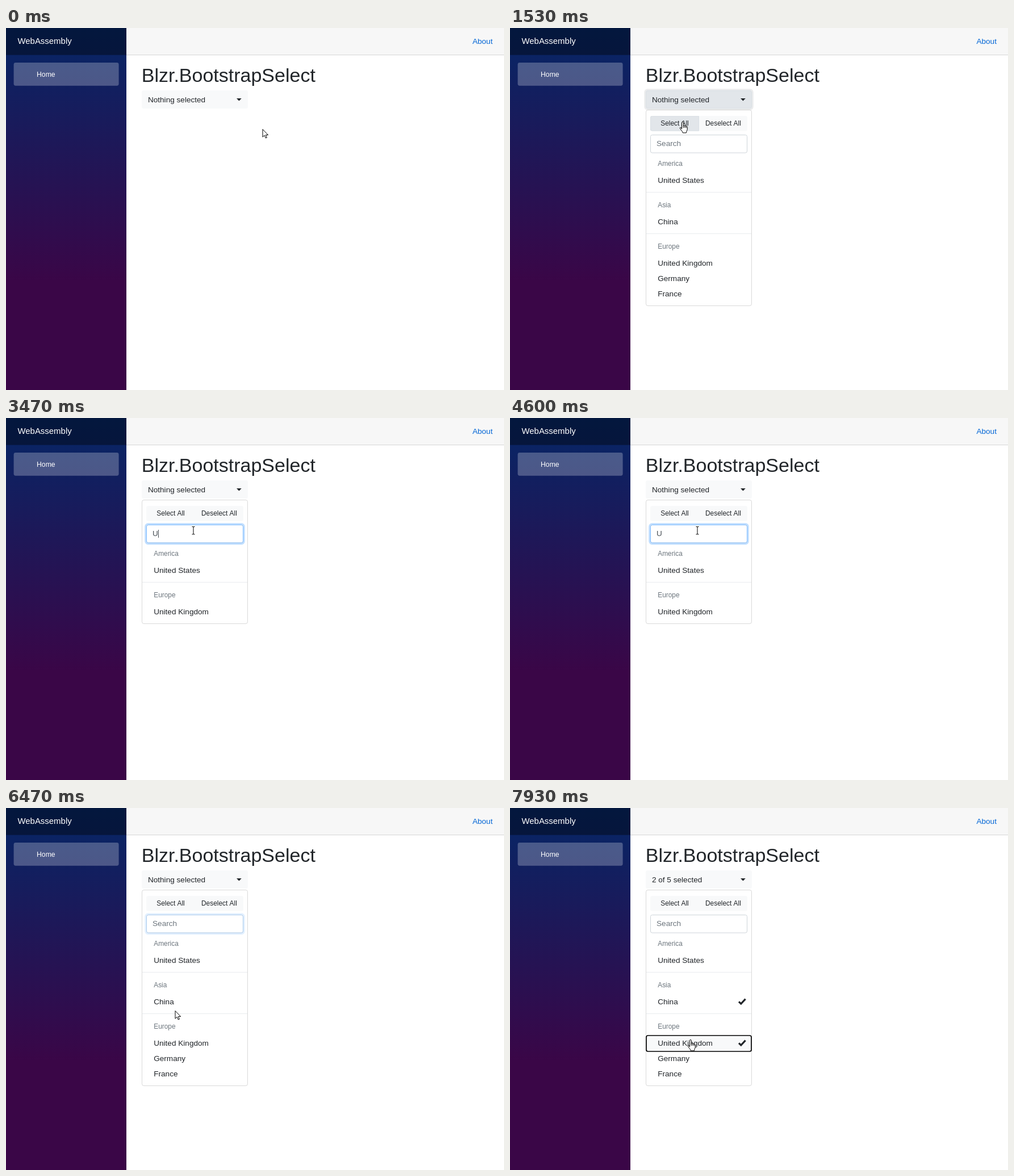
Recreate the animation shown at these times as an HTML page with a canvas. Size 877 by 638 pixels, loop 8000 ms.

```html
<!DOCTYPE html>
<html lang="en">
<head>
<meta charset="utf-8">
<title>Blzr.BootstrapSelect</title>
<style>
html, body { margin: 0; width: 100%; height: 100%; overflow: hidden; background: #fff; }
canvas { display: block; }
</style>
</head>
<body>
<canvas id="stage" width="877" height="638"></canvas>
<script>
const ctx = document.getElementById('stage').getContext('2d');
const LOOP = 8000, FADE = 150, BLINK = 530;
const DARK = '#212529', MUTED = '#6c757d', LIGHT = '#f8f9fa';

const groups = [
  ['America', ['United States']],
  ['Asia', ['China']],
  ['Europe', ['United Kingdom', 'Germany', 'France']],
];
const countries = groups.flatMap(group => group[1]);

// Times at which each control gains and loses focus
const focusSpans = {
  toggle: [800, 1600], all: [1600, 2270], none: [2270, 2930], search: [2930, 6390],
  China: [6800, 7530], 'United Kingdom': [7530, LOOP],
};
const queries = [[2930, ''], [3470, 'U'], [3670, 'Un'], [3870, 'Uni'], [4530, 'Un'], [4600, 'U'], [4870, '']];
// Typing restarts the caret blink, deleting does not
const blinkStarts = [[2930], [3470], [3670], [3870]];
const selections = [
  [0, []], [1600, countries], [2330, []], [6800, ['China']], [7530, ['China', 'United Kingdom']],
];
// time, x, y of the pointer's hot spot
const pointerPath = [
  [0, 452, 178], [70, 452, 178], [760, 376, 123], [870, 376, 123], [930, 376, 127], [1070, 376, 127],
  [1520, 304, 165], [1930, 304, 165], [2270, 365, 172], [2530, 365, 172], [2930, 330, 198],
  [5470, 330, 198], [5800, 306, 356], [6200, 306, 356], [6270, 303, 356], [6430, 303, 356],
  [6470, 298, 357], [6540, 298, 357], [6720, 300, 350], [7170, 300, 350], [7330, 300, 405],
  [7460, 299, 418], [7870, 299, 418], [7930, 318, 408], [LOOP, 318, 408],
];

const arrow = new Path2D('M0 .5V14.2L3.2 11.2 5.3 16 7.4 15.1 5.4 10.5H9.6Z');
const hand = new Path2D('M-1.5 13V1.8a1.4 1.4 0 0 1 2.8 0V8c0-1.6 2.6-1.6 2.6.2 0-1.3 2.4-1.2 2.4.5 0-1.1 2-1 2 .6V13' +
  'c0 2.5-1.7 3.5-2 6.8H.3C0 17-3 15-4.5 12c-.8-1.8 1-2.4 2-1.2zM1.3 7.5v3.5M3.9 8v3M6.3 8.6v2.6');
const beam = new Path2D('M-2.5-6.5H-1L0-6 1-6.5H2.5M0-6V6.5M-2.5 7H-1L0 6.5 1 7H2.5');

const clamp = v => Math.max(0, Math.min(1, v));
const latest = (list, t) => list.findLast(entry => entry[0] <= t);
const focused = (name, t) => name in focusSpans && t >= focusSpans[name][0] && t < focusSpans[name][1];

function focusLevel(name, t) {
  const [on, off] = focusSpans[name];
  return clamp((t - on) / FADE) * (1 - clamp((t - off) / FADE));
}

function pointerAt(t) {
  const i = pointerPath.findIndex(key => key[0] > t);
  const [t0, x0, y0] = pointerPath[i - 1], [t1, x1, y1] = pointerPath[i];
  const u = (t - t0) / (t1 - t0), k = u * u * (3 - 2 * u);
  return { x: x0 + (x1 - x0) * k, y: y0 + (y1 - y0) * k };
}

function fillRect(x, y, w, h, color) {
  ctx.fillStyle = color;
  ctx.fillRect(x, y, w, h);
}

function box(x, y, w, h, radius, fill, stroke, lineWidth = 1) {
  ctx.beginPath();
  ctx.roundRect(x, y, w, h, radius);
  if (fill) { ctx.fillStyle = fill; ctx.fill(); }
  if (stroke) { ctx.strokeStyle = stroke; ctx.lineWidth = lineWidth; ctx.stroke(); }
}

function text(str, x, y, size, color) {
  ctx.font = `${size}px "Liberation Sans", Arial, sans-serif`;
  ctx.fillStyle = color;
  ctx.fillText(str, x, y);
}

function ring(x, y, w, h, rgb, alpha) {
  if (alpha > 0) box(x - 1.35, y - 1.35, w + 2.7, h + 2.7, 4.5, null, `rgba(${rgb},${alpha})`, 2.7);
}

function button(name, t, pointer, x, y, w, h, radius) {
  const over = pointer.x >= x && pointer.x < x + w && pointer.y >= y && pointer.y < y + h;
  const level = focusLevel(name, t);
  box(x, y, w, h, radius, LIGHT);
  ctx.globalAlpha = over ? 1 : level;
  box(x, y, w, h, radius, '#e2e6ea');
  box(x + .5, y + .5, w - 1, h - 1, radius, null, '#dae0e5');
  ctx.globalAlpha = 1;
  ring(x, y, w, h, '216,217,219', level * .5);
  return over;
}

function drawPage() {
  fillRect(0, 0, 877, 638, '#fff');
  const side = ctx.createLinearGradient(0, 0, 0, 638);
  side.addColorStop(0, 'rgb(5,39,103)');
  side.addColorStop(.7, '#3a0647');
  fillRect(0, 0, 212, 638, side);
  fillRect(0, 0, 212, 47.6, 'rgba(0,0,0,.4)');
  text('WebAssembly', 20.4, 28, 14.96, '#fff');
  box(13.6, 61, 185, 40.7, 3.4, 'rgba(255,255,255,.25)');
  text('Home', 54, 86, 12.24, '#fff');
  fillRect(212, 0, 665, 47, '#f7f7f7');
  fillRect(212, 47, 665, 1, '#d6d5d5');
  text('About', 821.4, 28, 13.6, '#0366d6');
  text('Blzr.BootstrapSelect', 238.7, 95, 34, DARK);
}

function drawToggle(t, pointer, selected) {
  const over = button('toggle', t, pointer, 239, 110, 187, 32, 3.4);
  const n = selected.length;
  text(n ? `${n} of ${countries.length} selected` : 'Nothing selected', 249.9, 131, 13.6, DARK);
  ctx.beginPath();
  ctx.moveTo(406, 124);
  ctx.lineTo(414.8, 124);
  ctx.lineTo(410.4, 128.4);
  ctx.fill();
  return over;
}

function drawSearch(t, query) {
  const level = focusLevel('search', t);
  ring(247, 188, 171, 32.5, '0,123,255', level * .25);
  box(247.5, 188.5, 170, 31.5, 3, '#fff', '#ced4da');
  ctx.globalAlpha = level;
  box(247.5, 188.5, 170, 31.5, 3, null, '#80bdff');
  ctx.globalAlpha = 1;
  text(query || 'Search', 258, 208, 13.6, query ? '#495057' : MUTED);
  if (focused('search', t) && Math.floor((t - latest(blinkStarts, t)[0]) / BLINK) % 2 === 0) {
    fillRect(Math.round(258 + (query && ctx.measureText(query).width)), 197, 1, 14, '#495057');
  }
}

function drawItem(name, y, t, pointer, checked) {
  const over = pointer.x > 240 && pointer.x < 425 && Math.abs(pointer.y - y) < 13.6;
  const active = focused(name, t);
  if (over || active) fillRect(240, y - 13, 185, 27, LIGHT);
  text(name, 260.2, y + 5, 13.6, DARK);
  if (checked) {
    ctx.beginPath();
    ctx.moveTo(403, y + .4);
    ctx.lineTo(406.8, y + 4);
    ctx.lineTo(414.6, y - 4.4);
    ctx.strokeStyle = DARK;
    ctx.lineWidth = 3.2;
    ctx.stroke();
  }
  if (active) box(240, y - 13, 185, 28, 3, null, '#000', 1.7);
  return over;
}

function drawMenu(t, pointer, selected) {
  const query = (latest(queries, t) || [0, ''])[1];
  const shown = groups
    .map(([title, items]) => [title, items.filter(item => item.startsWith(query))])
    .filter(group => group[1].length);
  const rows = shown.reduce((sum, group) => sum + group[1].length, 0);
  box(239.5, 144.5, 186, 72 + shown.length * 46 + rows * 27, 3.4, '#fff', 'rgba(0,0,0,.15)');

  let over = button('all', t, pointer, 247, 155, 86, 26.5, [3, 0, 0, 3]);
  over = button('none', t, pointer, 333, 155, 85, 26.5, [0, 3, 3, 0]) || over;
  text('Select All', 265.2, 172, 11.9, DARK);
  text('Deselect All', 344, 172, 11.9, DARK);
  drawSearch(t, query);

  let y = 239;
  shown.forEach(([title, items], i) => {
    if (i) fillRect(240, y - 23, 185, 1, '#e9ecef');
    text(title, 260.2, y + 4, 11.9, MUTED);
    items.forEach((name, j) => {
      over = drawItem(name, y + 29 + 27 * j, t, pointer, selected.includes(name)) || over;
    });
    y += 46 + 27 * items.length;
  });
  return over;
}

function drawPointer({ x, y }, shape) {
  ctx.save();
  ctx.translate(Math.round(x), Math.round(y));
  ctx.lineWidth = 1;
  ctx.fillStyle = '#fff';
  ctx.strokeStyle = '#000';
  if (shape !== beam) ctx.fill(shape);
  ctx.stroke(shape);
  ctx.restore();
}

function frame(now) {
  const t = now % LOOP;
  const pointer = pointerAt(t);
  const selected = latest(selections, t)[1];
  drawPage();
  let over = drawToggle(t, pointer, selected);
  const open = t >= focusSpans.toggle[0];
  if (open) over = drawMenu(t, pointer, selected) || over;
  const inSearch = open && pointer.x > 247 && pointer.x < 418 && pointer.y > 188 && pointer.y < 221;
  drawPointer(pointer, inSearch ? beam : over ? hand : arrow);
  requestAnimationFrame(frame);
}
requestAnimationFrame(frame);
</script>
</body>
</html>
```
